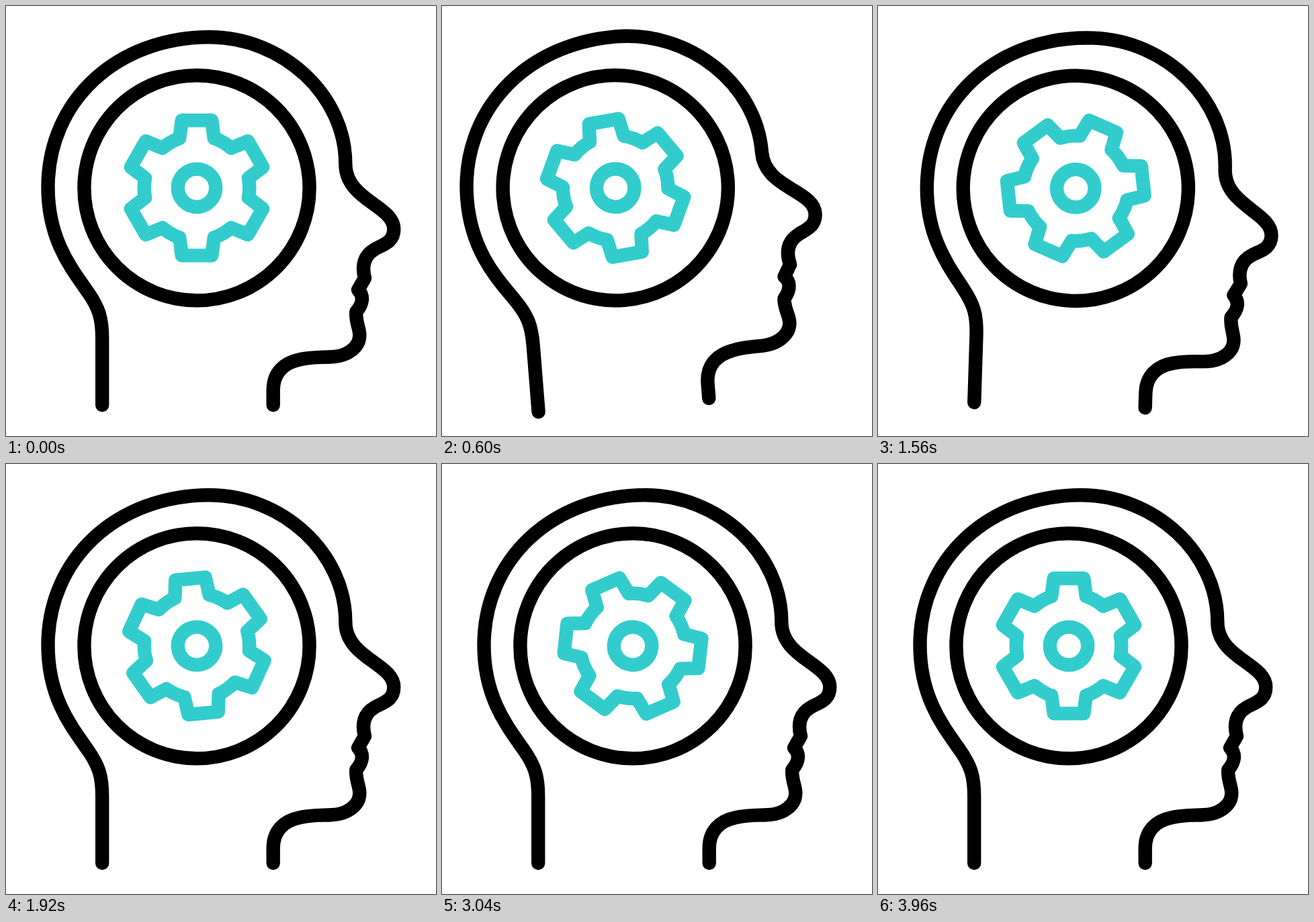
These frames come from a looping animation (640x640 px, 4000 ms). An HTML page:

```html
<!DOCTYPE html>
<html lang="en">
<head>
<meta charset="utf-8">
<title>Thinking head</title>
<style>
  html, body { margin: 0; width: 100%; height: 100%; overflow: hidden; background: #fff; }
  svg { display: block; width: 100%; height: 100%; }
  g { fill: none; stroke-width: 20.4; stroke-linecap: round; stroke-linejoin: round; }
</style>
</head>
<body>
<svg viewBox="0 0 640 640">
  <g id="head" stroke="#000">
    <path d="M143.2 594V495C143.2 464 138 449 122 426C100 394 62.5 350 62.5 270
      C62.5 141 165 46.3 303 46.3C412 46.3 505.3 133 505.3 235
      C505.3 289 577.3 297 577.3 332C577.3 352 561 355 549 362
      C533 371 529 386 534 405L524 422.5C533 431 531.5 443 521.3 455
      C520 470 526.3 479 526.3 490C526.3 508 508 521.5 484 522.3
      C470 523 455 522 438 526C413 531 397.7 546 397.7 572V594"/>
    <circle cx="284" cy="270.8" r="167.6"/>
    <g id="gear" stroke="#33cccc">
      <path id="teeth"/>
      <circle r="28.2"/>
    </g>
  </g>
</svg>
<script>
const LOOP = 4000, FRAME = 40, SWING = 320;
const PIVOT = "270.5 594", GEAR_CENTER = "284 270.8";
const swings = [0, 5, -5, 3, -2, 2, 0];   // head tilt in degrees, one per SWING
const head = document.getElementById("head");
const gear = document.getElementById("gear");

function teethPath() {
  const rim = 78.3, tipRadius = 103, rimAngle = 19.2, tipAngle = 12.5;
  const at = (radius, degrees) => {
    const a = degrees * Math.PI / 180;
    return `${(radius * Math.sin(a)).toFixed(2)} ${(-radius * Math.cos(a)).toFixed(2)}`;
  };
  let d = "";
  for (let a = 0; a < 360; a += 60) {
    d += `${a ? "L" : "M"}${at(rim, a - rimAngle)}L${at(tipRadius, a - tipAngle)}` +
         `L${at(tipRadius, a + tipAngle)}L${at(rim, a + rimAngle)}` +
         `A${rim} ${rim} 0 0 1 ${at(rim, a + 60 - rimAngle)}`;
  }
  return d + "Z";
}

function tilt(time) {
  const i = Math.floor(time / SWING);
  if (i >= swings.length - 1) return 0;
  const p = time / SWING - i;
  return swings[i] + (swings[i + 1] - swings[i]) * p * p * (3 - 2 * p);
}

function draw(now) {
  const time = Math.floor((now % LOOP) / FRAME) * FRAME;
  const spin = 360 * time / (LOOP - FRAME);
  head.setAttribute("transform", `rotate(${tilt(time)} ${PIVOT})`);
  gear.setAttribute("transform", `translate(${GEAR_CENTER}) rotate(${spin})`);
  requestAnimationFrame(draw);
}

document.getElementById("teeth").setAttribute("d", teethPath());
draw(performance.now());
</script>
</body>
</html>
```
